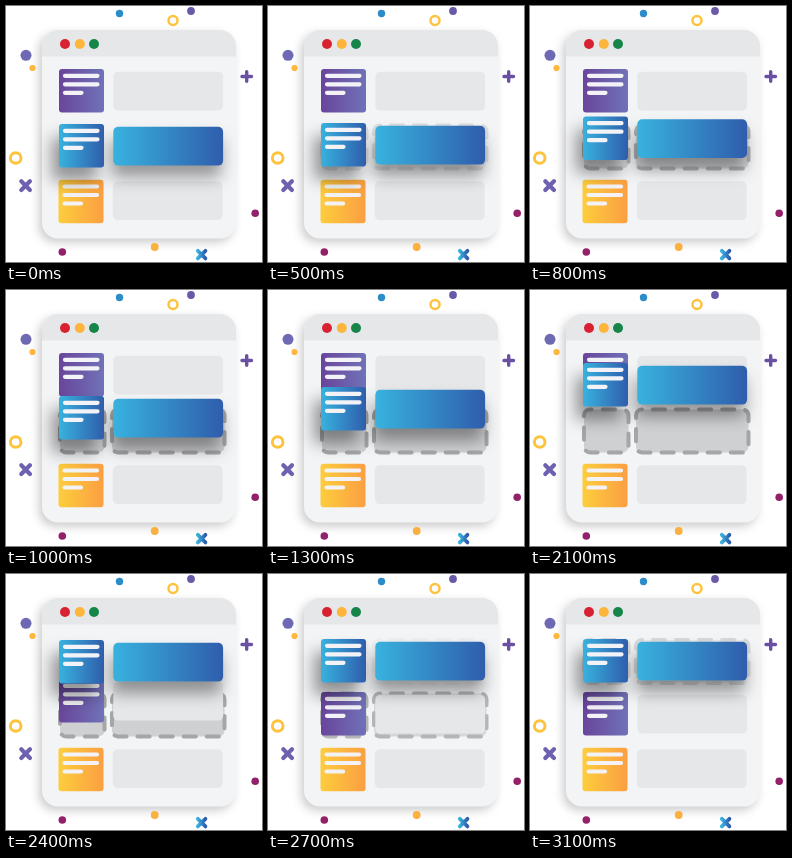
Animation of 256x256 px, one loop 8 s. Source, as an HTML page:

```html
<!DOCTYPE html>
<html>
<head>
<meta charset="utf-8">
<style>
html, body { margin: 0; width: 100%; height: 100%; overflow: hidden; background: #fff; }
svg { display: block; width: 100%; height: 100%; }
#window { filter: drop-shadow(-3px 4px 5px rgba(0, 0, 0, .2)); }
#blue .icon { filter: drop-shadow(-7px 13px 8px rgba(0, 0, 0, .4)); }
#blue .bar { filter: drop-shadow(-2px 12px 8px rgba(0, 0, 0, .38)); }
.slot { fill: #cfd0d2; stroke: #a5a6a8; stroke-width: 4; stroke-linecap: round; }
.wide { stroke-dasharray: 12.2 10.9; stroke-dashoffset: -10.8px; }
.small { stroke-dasharray: 12.2 11.3; stroke-dashoffset: -12.8px; }
</style>
</head>
<body>
<svg viewBox="0 0 256 256">
  <defs>
    <linearGradient id="gPurple"><stop stop-color="#69459b"/><stop offset="1" stop-color="#7072b8"/></linearGradient>
    <linearGradient id="gBlue"><stop stop-color="#38b2de"/><stop offset="1" stop-color="#2f5dac"/></linearGradient>
    <linearGradient id="gYellow"><stop stop-color="#fdcd3d"/><stop offset="1" stop-color="#fb9f42"/></linearGradient>
    <g id="lines" stroke="#f3f3f7" stroke-width="4.2" stroke-linecap="round">
      <path d="M59 6.800H91.500M59 15.300H91.500M59 23.800H75.500"/>
    </g>
    <g id="slotShape">
      <rect class="small" x="54" y="119.500" width="44.500" height="43" rx="6"/>
      <rect class="wide" x="106" y="119.500" width="112.500" height="43" rx="6"/>
    </g>
  </defs>

  <g id="confetti" fill="none">
    <g stroke="#fdc33c"><circle cx="167" cy="14.500" r="4.500" stroke-width="2.500"/><circle cx="9.700" cy="152" r="5.300" stroke-width="3"/></g>
    <g stroke-linecap="round">
      <path d="M236 70.500h9.500M240.700 65.700v9.500" stroke="#6a50a2" stroke-width="3.400"/>
      <path d="M15.300 175.300l8.600 8.600m0-8.600l-8.600 8.600" stroke="#6e62b0" stroke-width="4.200"/>
      <path d="M191.800 244.800l7.600 7.600m0-7.600l-7.600 7.600" stroke="url(#gBlue)" stroke-width="3.800"/>
    </g>
  </g>

  <g id="window">
    <rect x="36" y="24" width="194" height="208.500" rx="16" fill="#f3f4f6"/>
    <path d="M36 50.500V40a16 16 0 0 1 16-16H214a16 16 0 0 1 16 16V50.500Z" fill="#e6e7e9"/>
  </g>
  <g id="dots"></g>
  <g id="yellow" transform="translate(-.5 173.700)"></g>
  <g id="oldSlot" class="slot"><use href="#slotShape"/></g>
  <g id="newSlot" class="slot" transform="translate(0 -53.500)"><use href="#slotShape"/></g>
  <g id="purple"></g>
  <g id="blue"></g>
</svg>
<script>
const $ = id => document.getElementById(id);

function fillRow(id, icon, bar, barY) {
  $(id).innerHTML = `<rect class="bar" x="107.300" y="${barY}" width="109.800" height="38.800" rx="5" fill="${bar}"/>
    <rect class="icon" x="53" width="45" height="43.500" rx="3" fill="${icon}"/>
    <use href="#lines"/>`;
}
fillRow('yellow', 'url(#gYellow)', '#e6e7e9', 1.6);
fillRow('purple', 'url(#gPurple)', '#e6e7e9', 2.8);
fillRow('blue', 'url(#gBlue)', 'url(#gBlue)', 2.8);

const dots = [
  [59, 38, 5, '#d92231'], [73.8, 38, 5, '#fdb53b'], [88, 38, 5, '#158549'],
  [113.5, 7.5, 3.7, '#2c8cc8'], [185, 5, 3.9, '#6a59a9'],
  [20, 49.3, 5.5, '#6e69b3'], [26.5, 62, 3.1, '#fdb73e'],
  [56.3, 246, 3.8, '#92216a'], [249.2, 207.3, 3.8, '#92216a'], [148.7, 241, 3.9, '#fbb03f']
];
$('dots').innerHTML = dots.map(([x, y, r, c]) =>
  `<circle cx="${x}" cy="${y}" r="${r}" fill="${c}"/>`).join('');

// Linear interpolation through [time, value] keys, held at both ends.
function track(t, keys) {
  const i = keys.findIndex(k => k[0] > t);
  if (i < 0) return keys[keys.length - 1][1];
  if (i === 0) return keys[0][1];
  const [t0, v0] = keys[i - 1], [t1, v1] = keys[i];
  return v0 + (v1 - v0) * (t - t0) / (t1 - t0);
}

const blueY = [[400, 118], [500, 117], [1000, 106], [1700, 85], [2100, 73], [2400, 66], [2500, 65]];
const purpleY = [[2100, 63], [2200, 68], [2300, 86], [2400, 105], [2500, 118]];
const oldAlpha = [[400, 0], [500, .3], [900, 1], [2600, 1], [3100, 0]];
const newAlpha = [[2600, 0], [3100, .35]];

const start = performance.now();
function draw(now) {
  const t = Math.floor(Math.max(0, now - start) % 8000 / 100) * 100;
  $('blue').setAttribute('transform', `translate(0 ${track(t, blueY)})`);
  $('purple').setAttribute('transform', `translate(0 ${track(t, purpleY)})`);
  $('oldSlot').setAttribute('opacity', track(t, oldAlpha));
  $('newSlot').setAttribute('opacity', track(t, newAlpha));
  requestAnimationFrame(draw);
}
draw(start);
</script>
</body>
</html>
```
